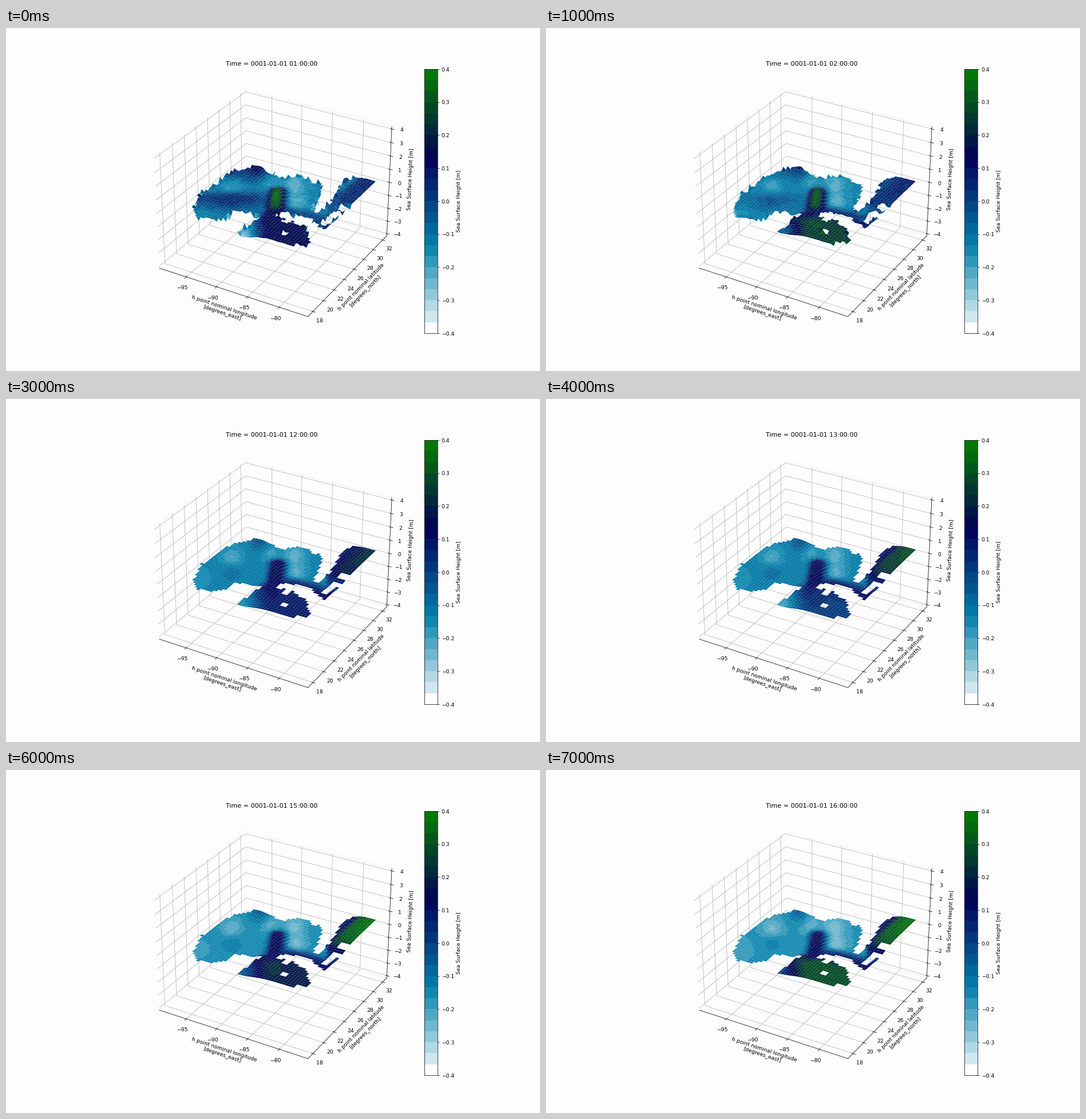
Animation of 933 by 600 pixels, one loop 8000 ms. Source, as a matplotlib script:

```python
import numpy as np
import matplotlib.pyplot as plt
from matplotlib.animation import FuncAnimation
from matplotlib.colors import ListedColormap, Normalize
from matplotlib.path import Path
from mpl_toolkits.mplot3d import proj3d
from mpl_toolkits.mplot3d.art3d import Poly3DCollection

W, H, DPI = 933, 600, 200 / 3
PAPER = "#fdfdfd"
HOURS = [1, 2, *range(11, 17)]
BANDS = 24


def box(x0, y0, x1, y1):
    return [(x0, y0), (x1, y0), (x1, y1), (x0, y1)]


# Land outlines as a few (longitude, latitude) points
MAINLAND = [
    (-87.8, 17), (-87.4, 20), (-86.9, 21.5), (-90.4, 21.1), (-90.7, 19.5),
    (-92, 18.6), (-94.5, 18.3), (-96.2, 19.3), (-97.7, 22.3), (-97.1, 27.5),
    (-94.5, 29.5), (-92, 29.5), (-89.5, 28.9), (-89.2, 30.1), (-86.4, 30.4),
    (-85.3, 29.7), (-84, 30), (-83, 29.2), (-81.2, 25.1), (-80.7, 25.1),
    (-80.5, 26.8), (-81.7, 30.5), (-81, 34), (-100, 34), (-100, 17),
]
CUBA = [
    (-84.9, 21.8), (-84, 22.7), (-82.5, 23.1), (-80.5, 23.1), (-76, 21.2),
    (-76, 19.9), (-77.7, 19.9), (-78.4, 20.7), (-79.5, 21.5), (-81.8, 22.1),
    (-82, 22.6), (-83.8, 22.2),
]
BANK = [(-78.7, 24.4), (-78.2, 23.2), (-77.8, 23.3), (-77.8, 26)]
LAND = [
    MAINLAND, CUBA, BANK,
    box(-78.4, 26.3, -77, 26.8),
    box(-83.1, 21.4, -82.5, 21.9),
    box(-77.9, 24.9, -77, 25.3),
    box(-78.5, 18, -77, 18.6),
    box(-81.53, 19.44, -81.07, 19.75),
]

# Standing eddies in the gulf: stage position and height
EDDIES = [
    (395, 273, -0.09), (460, 263, -0.08), (505, 268, -0.10),
    (508, 302, -0.10), (340, 310, -0.04), (445, 247, 0.12), (395, 298, 0.05),
]


def sigmoid(x):
    return 1 / (1 + np.exp(-np.clip(x, -50, 50)))


def smooth(x):
    x = np.clip(x, 0, 1)
    return x * x * (3 - 2 * x)


def mix(a, b, amount):
    return a + (b - a) * amount


fig = plt.figure(figsize=((W + 1e-6) / DPI, (H + 1e-6) / DPI), dpi=DPI,
                 facecolor=PAPER)
ax = fig.add_subplot(projection="3d")
ax.set_facecolor("none")
ax.set_xticks(range(-95, -79, 5))
ax.set_yticks(range(18, 33, 2))
ax.set_zticks(range(-4, 5))
ax.set_xlim(-99.51, -75.59)
ax.set_ylim(17.08, 32.92)
ax.set_zlim(-4 - 1 / 6, 4 + 1 / 6)
ax.set_xlabel("h point nominal longitude\n[degrees_east]")
ax.set_ylabel("h point nominal latitude\n[degrees_north]")
ax.set_zlabel("Sea Surface Height [m]")
for axis in (ax.xaxis, ax.yaxis, ax.zaxis):
    axis.pane.set_fill(False)
title = fig.text(464.2 / W, 1 - 66.4 / H, "", ha="center", fontsize=12)

# Sea grid and its position on the stage at zero height
lon, lat = np.meshgrid(np.linspace(-98.1, -77.3, 46),
                       np.linspace(18.1, 32.3, 47))
spots = np.column_stack([lon.ravel(), lat.ravel()])
sea = ~np.any([Path(land).contains_points(spots) for land in LAND], axis=0)
sea = sea.reshape(lon.shape)
u, v, _ = proj3d.proj_transform(lon.ravel(), lat.ravel(),
                                np.zeros(lon.size), ax.get_proj())
px = (470.6 + 2497.3 * np.asarray(u)).reshape(lon.shape)
py = (296.8 - 2497.3 * np.asarray(v)).reshape(lon.shape)

# Where each basin takes over from the gulf
west = sigmoid((455 - px) / 8)
straits = sigmoid((24.3 - lat) / 0.4) * sigmoid((lon + 85) / 0.4)
atlantic = sigmoid((lat - 25.5) / 0.8) * sigmoid((lon + 81.8) / 0.2)
atlantic *= (px > 560)
offshore = sigmoid((lon + 80.2) / 0.4)
caribbean = sigmoid((21.9 - lat) / 0.3) * sigmoid((lon + 87.6) / 0.2)

# Narrow current running north from the channel
center = np.interp(py, [290, 320, 338], [475, 470, 458])
current = (np.exp(-(np.abs(px - center) / 15) ** 3)
           * sigmoid((py - 281) / 3) * sigmoid((336 - py) / 4))

padded = np.pad(sea, 1, constant_values=True)
coast = sea & ~(padded[:-2, 1:-1] & padded[2:, 1:-1]
                & padded[1:-1, :-2] & padded[1:-1, 2:])


def bump(x, y, radius):
    return np.exp(-((px - x) ** 2 + (py - y) ** 2) / radius ** 2)


def corners(a):
    """The four corner values of every grid cell."""
    return np.stack([a[:-1, :-1], a[:-1, 1:], a[1:, 1:], a[1:, :-1]], axis=-1)


wet = corners(sea).all(axis=-1)


def sea_level(hour):
    start = np.exp(1 - hour)  # fades as the sea settles
    swell = 0.09 + 0.07 * np.cos((py - 300) / 8)
    z = -0.12 - 0.04 * smooth((hour - 13) / 3) + start * west * swell
    z = z + sum(a * bump(x, y, 18) for x, y, a in EDDIES)
    z = mix(z, 0.11 - 0.07 * start, straits)
    tide = 0.07 + 0.27 * smooth((hour - 9) / 6)
    z = mix(z, mix(0.08 - 0.2 * start, tide, offshore), atlantic)
    tide = 0.16 + 0.13 * np.cos(2 * np.pi * (hour - 16.4) / 6.8)
    tide = tide - (0.25 + 0.2 * start) * bump(408, 356, 32)
    z = mix(z, tide + 0.04 * bump(460, 345, 18), caribbean)
    crest = 0.12 + 0.22 * np.exp((1 - hour) / 8)
    z = mix(z, mix(crest, 0.13, smooth((py - 312) / 20)), current)
    noise = np.random.default_rng(hour).normal(size=z.shape)
    rough = 0.15 * np.exp((1 - hour) / 3)
    return z + rough * noise * np.where(coast, 1, 0.08)


def cells(z):
    return np.stack([corners(a)[wet] for a in (lon, lat, z)], axis=-1)


colors = plt.get_cmap("ocean_r")((np.arange(BANDS) + 0.5) / BANDS)
colors[0] = 1
surface = Poly3DCollection(cells(sea_level(HOURS[0])), linewidths=0.25,
                           cmap=ListedColormap(colors),
                           norm=Normalize(-0.4, 0.4))
surface.set_array(np.zeros(int(wet.sum())))
ax.add_collection3d(surface)
fig.colorbar(surface, ax=ax, label="Sea Surface Height [m]")


def draw(i):
    quads = cells(sea_level(HOURS[i]))
    surface.set_verts(quads)
    surface.set_array(quads[..., 2].mean(axis=1))
    title.set_text(f"Time = 0001-01-01 {HOURS[i]:02d}:00:00")
    return surface, title


anim = FuncAnimation(fig, draw, frames=len(HOURS), interval=1000,
                     repeat=True, repeat_delay=0, blit=False)
plt.show()
```
